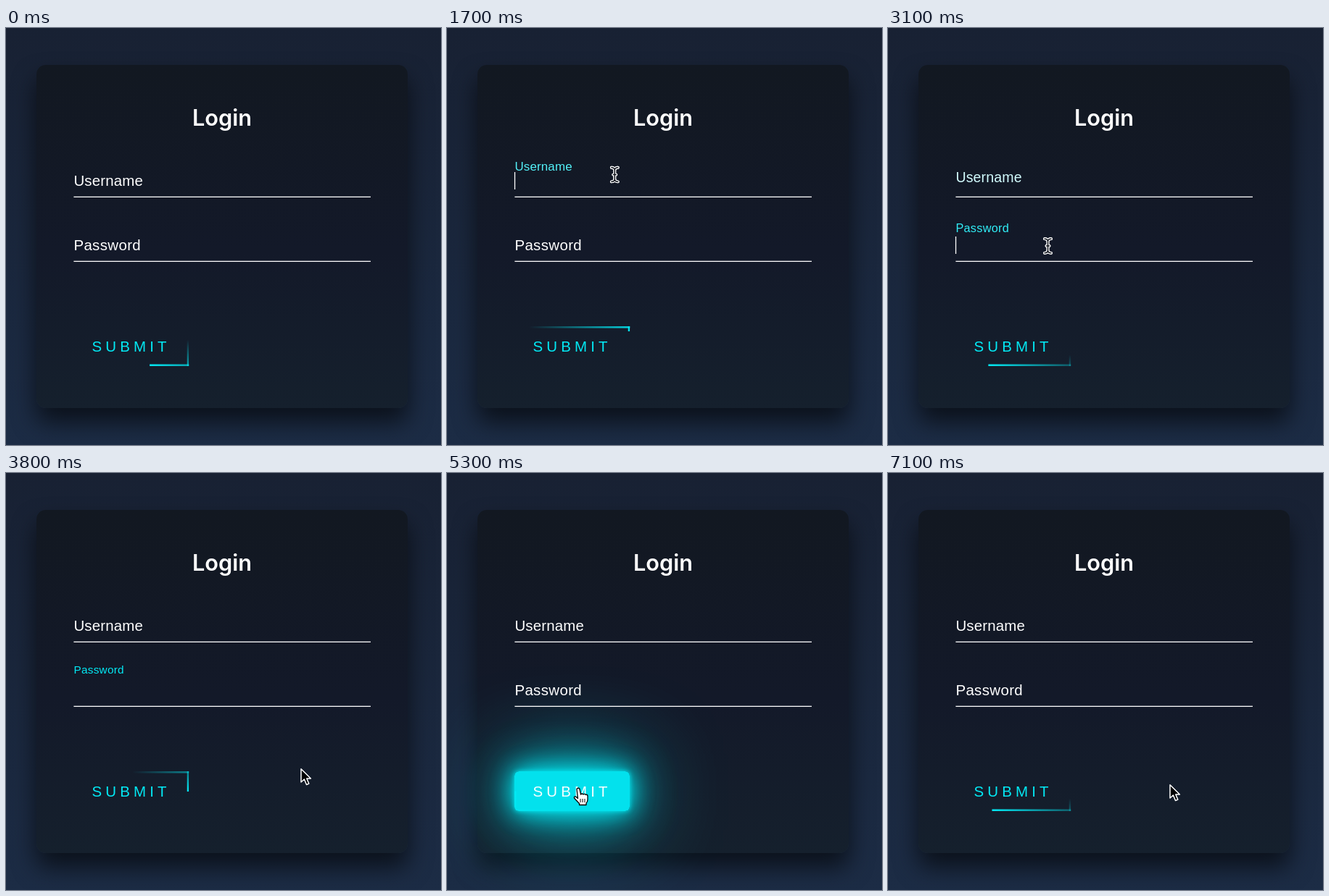
Animation, 600 px wide and 576 px high, one loop 7200 ms. Source, as an HTML page:

```html
<!DOCTYPE html>
<html lang="en">
<head>
<meta charset="utf-8">
<title>Login</title>
<style>
html, body { margin: 0; width: 100%; height: 100%; overflow: hidden; }
body { position: relative; background: linear-gradient(#182133, #1c2c45); }
#box, #btn, svg { position: absolute; }
#box {
  left: 42px; top: 51px; width: 512px; height: 474px; border-radius: 12.8px;
  background: linear-gradient(#121821, #131929 55%, #15202d);
  box-shadow: 0 19.2px 32px rgba(0, 0, 0, .6);
}
#btn { left: 93px; top: 412px; width: 159.3px; height: 55px; }
svg { left: 0; top: 0; }
text { font-family: "Liberation Sans", Arial, sans-serif; font-size: 20.48px; fill: #fff; }
#title { font: 600 30.72px Inter, sans-serif; }
#submit { letter-spacing: 5.12px; }
</style>
</head>
<body>
<div id="box"></div>
<div id="btn"></div>
<svg width="600" height="576" viewBox="0 0 600 576">
  <defs>
    <linearGradient id="g0"><stop stop-color="#03e9f4" stop-opacity="0"/><stop offset="1" stop-color="#03e9f4"/></linearGradient>
    <linearGradient id="g1" href="#g0" x1="0" y1="0" x2="0" y2="1"/>
    <linearGradient id="g2" href="#g0" x1="1" y1="0" x2="0" y2="0"/>
    <linearGradient id="g3" href="#g0" x1="0" y1="1" x2="0" y2="0"/>
    <clipPath id="clip"><rect id="clipBox" x="93" y="412" width="159.3" height="55"/></clipPath>
  </defs>
  <text id="title" x="298" y="135" text-anchor="middle">Login</text>
  <g fill="#fff">
    <rect x="93.4" y="232.7" width="409.6" height="1.28"/>
    <rect x="93.4" y="321.7" width="409.6" height="1.28"/>
    <rect id="caret" x="92.9" width="1.28" height="24"/>
  </g>
  <text id="user" x="93.4" letter-spacing=".008em">Username</text>
  <text id="pass" x="93.4" letter-spacing=".017em">Password</text>
  <g id="bars" clip-path="url(#clip)">
    <rect fill="url(#g0)" y="412" width="159.3" height="2.56"/>
    <rect fill="url(#g1)" x="249.74" width="2.56" height="55"/>
    <rect fill="url(#g2)" y="464.44" width="159.3" height="2.56"/>
    <rect fill="url(#g3)" x="93" width="2.56" height="55"/>
  </g>
  <text id="submit" x="118.6" y="447.3">SUBMIT</text>
  <g id="cursor">
    <path id="arrow" d="M0 .7V19L4.4 15 7.5 22.5 10.8 21.1 7.8 14H13.4Z" stroke="#fff" stroke-width="1.5" stroke-linejoin="round"/>
    <g id="beam" fill="none" stroke-linecap="round">
      <path id="ibar" d="M-4.5-9.8Q0-9.8 0-6V6Q0 9.8-4.5 9.8M4.5-9.8Q0-9.8 0-6M4.5 9.8Q0 9.8 0 6M-2 0H2" stroke="#fff" stroke-width="3.8"/>
      <use href="#ibar" id="icore"/>
      <path d="M-4.5-9.8Q0-9.8 0-6V6Q0 9.8-4.5 9.8M4.5-9.8Q0-9.8 0-6M4.5 9.8Q0 9.8 0 6M-2 0H2" stroke="#10141c" stroke-width="1.5"/>
    </g>
    <g id="hand" stroke="#000" stroke-width="1.3" stroke-linejoin="round">
      <path fill="#fff" d="M-2 1.5Q0-1 2 1.5L3.5 9Q5 7 7 9 9 7.5 10.5 9.5 12.5 8.5 13 11V16Q13 19 11 21V23.5H1.5V21.5Q-2 18-5.5 14-6 11.5-3.5 12L-.5 14.5Z"/>
      <path fill="none" stroke-width="1" d="M3 15v5M6 15v5M9 15v5"/>
    </g>
  </g>
</svg>
<script>
const $ = id => document.getElementById(id);
const LOOP = 7200, STEP = 100;
const BTN = { x: 93, y: 412, w: 159.3, h: 55 };
const CLICK_USER = 1500, CLICK_PASS = 2840, CLICK_AWAY = 3820;
const HOVER_IN = 4920, HOVER_OUT = 6560;
const WHITE = [255, 255, 255], CYAN = [3, 233, 244];

// time, x, y of the pointer
const path = [
  [700, 476, 90], [800, 322, 130], [900, 262, 168], [1000, 240, 192],
  [1100, 233, 200], [1800, 231, 203], [2200, 219, 278], [2400, 215, 298],
  [3000, 215, 298], [3200, 226, 304], [3600, 390, 396], [3800, 407, 408],
  [4000, 404, 408], [4400, 398, 406], [4600, 376, 398], [4700, 353, 391],
  [4800, 295, 405], [4900, 256, 421], [5000, 215, 433], [5200, 181, 435],
  [6400, 181, 435], [6500, 196, 436], [6600, 275, 438], [6800, 370, 434],
  [7000, 392, 430], [7100, 389, 430]
];

const lerp = (a, b, p) => a + (b - a) * p;
const mix = (a, b, p) => `rgb(${a.map((v, i) => Math.round(lerp(v, b[i], p)))})`;

// CSS "ease": cubic-bezier(.25, .1, .25, 1)
function ease(x) {
  if (x <= 0) return 0;
  if (x >= 1) return 1;
  let lo = 0, hi = 1, u;
  for (let i = 0; i < 24; i++) {
    u = (lo + hi) / 2;
    const bx = .75 * u * (1 - u) + u ** 3;
    if (bx < x) lo = u; else hi = u;
  }
  return .3 * u * (1 - u) ** 2 + 3 * u * u * (1 - u) + u ** 3;
}

// half-second transition on at `a`, off again at `b`
const toggle = (t, a, b) => t < b ? ease((t - a) / 500) : 1 - ease((t - b) / 500);

function setLabel(id, base, lift, p) {
  const s = $(id).style;
  s.fontSize = lerp(20.48, 15.36, p) + 'px';
  s.fill = mix(WHITE, CYAN, p);
  $(id).setAttribute('y', base - lift * p);
}

function setCaret(t) {
  const inPass = t >= CLICK_PASS;
  const since = t - (inPass ? CLICK_PASS : CLICK_USER);
  const on = since >= 0 && t < CLICK_AWAY && since % 1000 < 500;
  $('caret').setAttribute('y', inPass ? 288 : 199);
  $('caret').setAttribute('visibility', on ? 'visible' : 'hidden');
}

function setBars(t) {
  const clock = .585 + t * .000998;
  [...$('bars').children].forEach((bar, i) => {
    const run = (clock - i * .25 + 1) % 1;
    const shift = Math.min(run * 4, 2) - 1;
    const dir = i < 2 ? 1 : -1;
    if (i % 2) bar.setAttribute('y', BTN.y + dir * shift * BTN.h);
    else bar.setAttribute('x', BTN.x + dir * shift * BTN.w);
  });
}

function setButton(p) {
  const s = $('btn').style, color = `rgba(${CYAN},${p})`;
  s.background = color;
  s.borderRadius = 6.4 * p + 'px';
  s.boxShadow = [6.4, 32, 64, 128].map(b => `0 0 ${b * p}px ${color}`).join();
  $('clipBox').setAttribute('rx', 6.4 * p);
  $('submit').style.fill = mix(CYAN, WHITE, p);
}

function setCursor(t) {
  const shown = t >= path[0][0];
  $('cursor').style.display = shown ? '' : 'none';
  if (!shown) return;
  let i = 0;
  while (i < path.length - 2 && path[i + 1][0] <= t) i++;
  const [t0, x0, y0] = path[i], [t1, x1, y1] = path[i + 1];
  const p = Math.min((t - t0) / (t1 - t0), 1);
  const x = lerp(x0, x1, p), y = lerp(y0, y1, p);
  const inField = x > 93 && x < 503 && (y > 187 && y < 234 || y > 276 && y < 323);
  const inBtn = t >= HOVER_IN && t < HOVER_OUT;
  const kind = inField ? 'beam' : inBtn ? 'hand' : 'arrow';
  for (const k of ['arrow', 'beam', 'hand']) $(k).style.display = k === kind ? '' : 'none';
  $('cursor').setAttribute('transform', `translate(${x} ${y})`);
}

function draw() {
  const t = Math.floor(performance.now() % LOOP / STEP) * STEP;
  setLabel('user', 218.3, 31.3, toggle(t, CLICK_USER, CLICK_PASS));
  setLabel('pass', 307.3, 30.3, toggle(t, CLICK_PASS, CLICK_AWAY));
  setCaret(t);
  setBars(t);
  setButton(toggle(t, HOVER_IN, HOVER_OUT));
  setCursor(t);
  requestAnimationFrame(draw);
}
draw();
</script>
</body>
</html>
```
